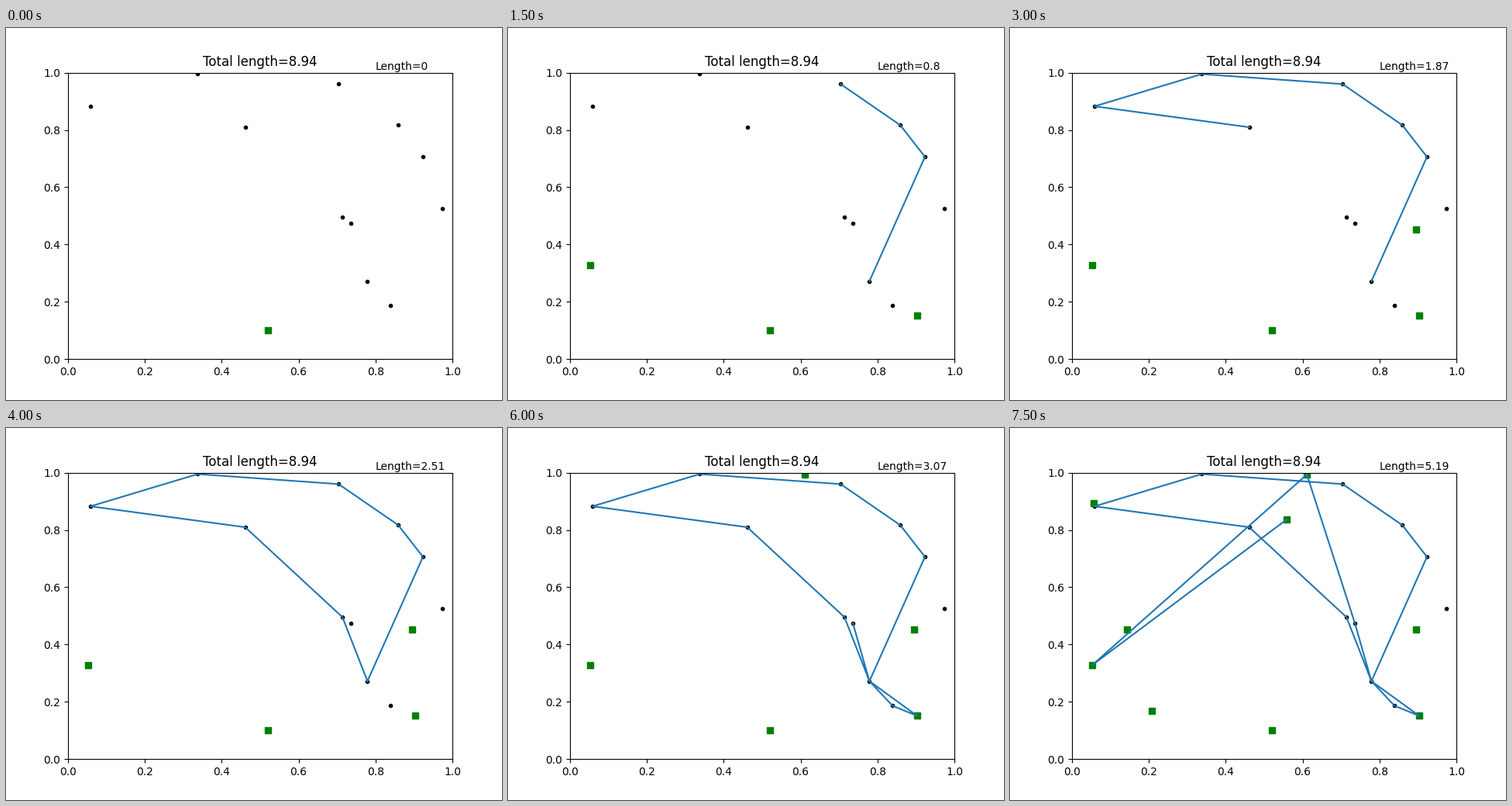
Write a matplotlib script that moves like this. It is 640x480 px and loops after 8000 ms.

```python
import numpy as np
import matplotlib.pyplot as plt
from matplotlib.animation import FuncAnimation

FRAMES = 16
STEP_MS = 500
TOTAL = 8.94

# Fixed targets, drawn as black dots
DOTS = {
    "A": (0.779, 0.272), "B": (0.9234, 0.706), "C": (0.859, 0.817),
    "D": (0.704, 0.960), "E": (0.3375, 0.995), "F": (0.0585, 0.8825),
    "G": (0.461, 0.8095), "H": (0.714, 0.4955), "I": (0.839, 0.186),
    "K": (0.736, 0.474), "O": (0.974, 0.5255),
}

# Requests that show up later: position and the step they appear at
REQUESTS = {
    "P": (0.520, 0.1005, 0), "M": (0.0525, 0.328, 3), "J": (0.903, 0.151, 3),
    "Q": (0.895, 0.4525, 5), "L": (0.611, 0.9935, 10), "N": (0.5585, 0.8365, 13),
    "R": (0.0565, 0.8925, 14), "S": (0.1435, 0.4525, 14), "T": (0.208, 0.168, 14),
}

ROUTE = "ABCDEFGHAIJAKLMN"

places = {**DOTS, **{k: v[:2] for k, v in REQUESTS.items()}}
path = np.array([places[k] for k in ROUTE])
legs = np.hypot(*np.diff(path, axis=0).T)
travelled = np.concatenate([[0], np.cumsum(legs)])

plt.rcParams["font.family"] = "DejaVu Sans"
fig, ax = plt.subplots(figsize=(6.4, 4.8), dpi=100)
ax.set(xlim=(0, 1), ylim=(0, 1))
ax.set_title(f"Total length={TOTAL}")
ax.plot(*zip(*DOTS.values()), "k.")
squares, = ax.plot([], [], "gs")
line, = ax.plot([], [], color="C0")
label = ax.text(0.8, 1.01, "")


def update(step):
    seen = [(x, y) for x, y, start in REQUESTS.values() if start <= step]
    squares.set_data(*zip(*seen))
    line.set_data(*path[:step + 1].T)
    length = round(float(travelled[step]), 2) if step else 0
    label.set_text(f"Length={length}")
    return squares, line, label


anim = FuncAnimation(fig, update, frames=FRAMES, interval=STEP_MS,
                     repeat=True, repeat_delay=0)
plt.show()
```
